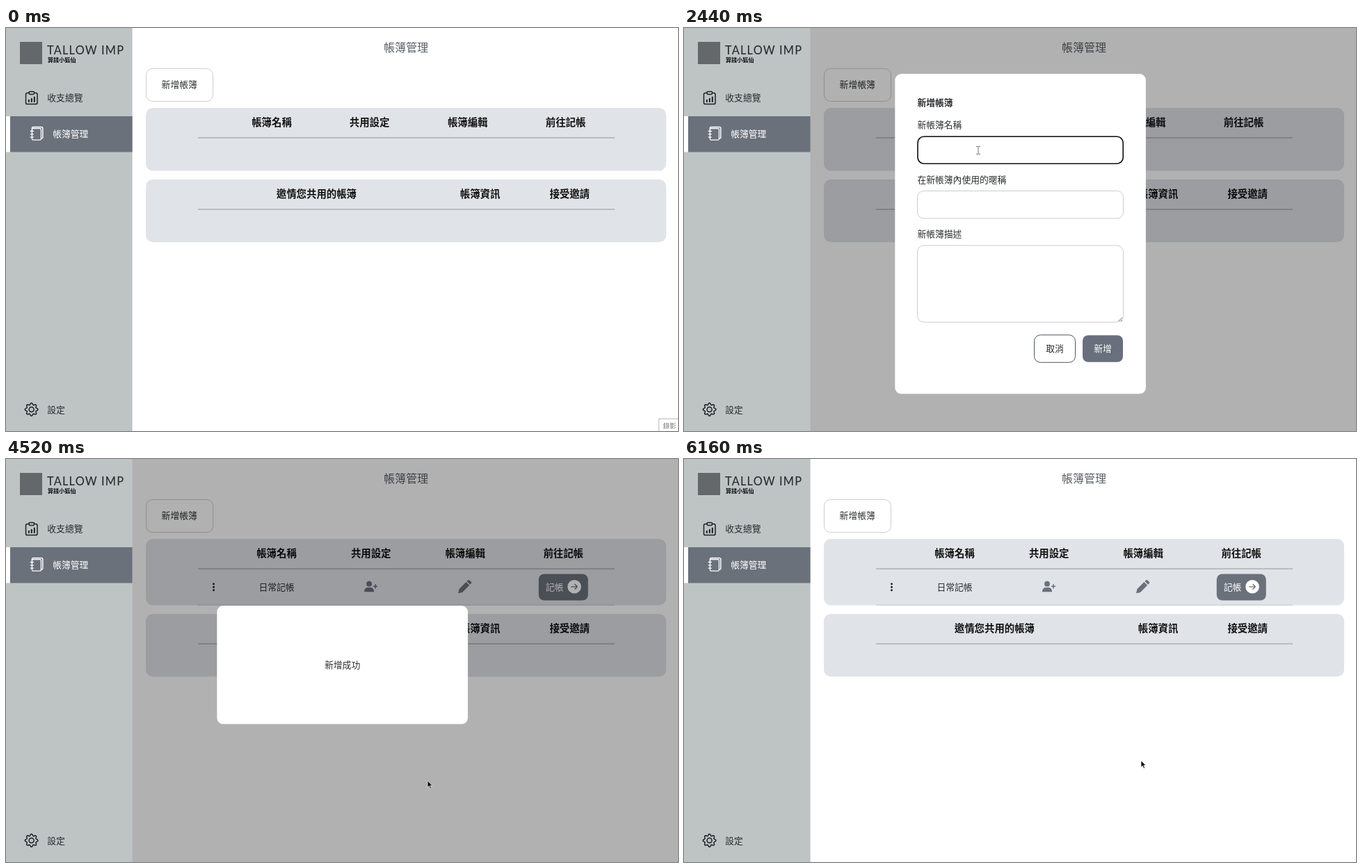
Recreate the animation shown at these times as an HTML page. Size 966 by 580 pixels, loop 6230 ms.

```html
<!DOCTYPE html>
<html lang="zh-Hant-TW">
<head>
<meta charset="utf-8">
<title>帳簿管理</title>
<style>
html, body { margin: 0; width: 100%; height: 100%; overflow: hidden; background: #fff; }
svg { display: block; width: 100%; height: 100%; }
text { font: 400 12.8px "Noto Sans CJK TC", "Noto Sans CJK", "Noto Sans CJK JP", sans-serif; fill: #2b2d30; }
.mid { text-anchor: middle; }
.head { font-size: 14.4px; font-weight: 700; fill: #111; text-anchor: middle; }
.white { fill: #fff; }
.panel { fill: #e0e3e8; }
.rule { stroke: #b9bdc0; stroke-width: 2; }
.field { fill: #fff; stroke: #c9ccd1; }
.line { fill: none; stroke: #1d2023; stroke-width: 1.5; stroke-linecap: round; stroke-linejoin: round; }

.early, .late, .shift, .tip, .name, .rest, .hover, .arrow, .beam, .hand {
  animation: 6230ms step-end infinite;
}
.early { animation-name: early; }
.late { animation-name: late; }
.shift { animation-name: shift; }
.tip { animation-name: tip; }
.name { animation-name: name; }
.rest { animation-name: rest; }
.hover { animation-name: hover; }
.arrow { animation-name: arrow; }
.beam { animation-name: beam; }
.hand { animation-name: hand; }
.layer { animation: layer 6230ms ease infinite; }
.focus { animation: focus 6230ms linear infinite; }
.cursor { animation: move 6230ms linear infinite; }

@keyframes early { 0% { opacity: 1 } 70.3%, 100% { opacity: 0 } }
@keyframes late { 0% { opacity: 0 } 70.3%, 100% { opacity: 1 } }
@keyframes shift { 0% { transform: none } 70.3%, 100% { transform: translateY(5px) } }
@keyframes tip { 0% { opacity: 1 } 1.12%, 100% { opacity: 0 } }
@keyframes name { 0% { opacity: 0 } 48.15%, 100% { opacity: 1 } }
@keyframes rest { 0% { opacity: 0 } 49.27%, 100% { opacity: 1 } }
@keyframes hover { 0% { opacity: 0 } 63.3% { opacity: 1 } 70.3%, 100% { opacity: 0 } }
@keyframes layer {
  0%, 17.5% { opacity: 0 }
  22.31%, 94.22% { opacity: 1 }
  98.8%, 100% { opacity: 0 }
}
@keyframes focus {
  0%, 29.4% { opacity: 0 }
  30.5%, 49.2% { opacity: 1 }
  49.27%, 100% { opacity: 0 }
}
@keyframes move {
  0%, 1.1% { transform: translate(950px, 588px); animation-timing-function: cubic-bezier(.35, .1, .4, 1) }
  11% { transform: translate(242px, 81px) }
  12.1%, 17.5% { transform: translate(245px, 80px); animation-timing-function: ease-in }
  19.7% { transform: translate(272px, 98px) }
  27.2% { transform: translate(418px, 173px) }
  28.4%, 39.2% { transform: translate(423px, 176px) }
  47%, 48.6% { transform: translate(893px, 584px) }
  49.3% { transform: translate(884px, 573px) }
  58.2% { transform: translate(709px, 494px) }
  63.4%, 64.9% { transform: translate(628.5px, 470px) }
  68.2%, 75% { transform: translate(606px, 463px); animation-timing-function: ease-in }
  80.1% { transform: translate(632px, 446px) }
  83.4%, 86.7% { transform: translate(661px, 415px) }
  90%, 100% { transform: translate(657px, 434px) }
}
@keyframes arrow {
  0% { opacity: 1 } 25.6% { opacity: 0 } 39.6% { opacity: 1 } 40.3% { opacity: 0 }
  41.1% { opacity: 1 } 41.8% { opacity: 0 } 42.6% { opacity: 1 } 63.3% { opacity: 0 } 70.3%, 100% { opacity: 1 }
}
@keyframes beam {
  0% { opacity: 0 } 25.6% { opacity: 1 } 39.6% { opacity: 0 } 40.3% { opacity: 1 }
  41.1% { opacity: 0 } 41.8% { opacity: 1 } 42.6%, 100% { opacity: 0 }
}
@keyframes hand { 0% { opacity: 0 } 63.3% { opacity: 1 } 70.3%, 100% { opacity: 0 } }
</style>
</head>
<body>
<svg viewBox="0 0 966 580">
  <rect width="966" height="580" fill="#fff"/>
  <text class="mid" x="575" y="33.5" style="font-size:16px;font-weight:500;fill:#595e65">帳簿管理</text>
  <rect x="201.5" y="58.5" width="96" height="47" rx="9" fill="#fff" stroke="#cbced2"/>
  <text class="mid" x="249.2" y="86.3">新增帳簿</text>

  <!-- own books -->
  <g class="early">
    <rect class="panel" x="201" y="115" width="748" height="90.5" rx="10"/>
    <text class="head" x="382" y="141.4">帳簿名稱</text>
    <text class="head" x="522.6" y="141.4">共用設定</text>
    <text class="head" x="663.7" y="141.4">帳簿編輯</text>
    <text class="head" x="804.6" y="141.4">前往記帳</text>
  </g>
  <g class="late">
    <rect class="panel" x="201" y="115" width="748" height="95.5" rx="10"/>
    <text class="head" x="389" y="141.4">帳簿名稱</text>
    <text class="head" x="524.7" y="141.4">共用設定</text>
    <text class="head" x="660.2" y="141.4">帳簿編輯</text>
    <text class="head" x="801.2" y="141.4">前往記帳</text>
    <path d="M276 210.2H875" stroke="#c3c7ca"/>
    <g fill="#222">
      <circle cx="298.5" cy="179.8" r="1.5"/><circle cx="298.5" cy="184.3" r="1.5"/><circle cx="298.5" cy="188.8" r="1.5"/>
    </g>
    <text class="mid" x="389" y="188.6">日常記帳</text>
    <g fill="#6b717b">
      <circle cx="522" cy="179.7" r="3.9"/>
      <path d="M515 191.2C515 186.8 517.6 184.9 520 184.9H524C526.6 184.9 529 186.8 529 191.2Z"/>
      <path d="M531 180.3V186.3M528 183.3H534" stroke="#6b717b" stroke-width="1.6"/>
      <path d="M650 193.2L651.3 187.2 661.4 177.1 666.1 181.8 656 191.9ZM662.5 176L664.2 174.3Q665.3 173.5 666.4 174.4L668.7 176.7Q669.7 177.8 668.8 178.9L667.1 180.7Z"/>
      <rect x="765.7" y="165.5" width="71" height="38" rx="8"/>
    </g>
    <text class="white" x="775.7" y="188.6">記帳</text>
    <circle cx="817" cy="183.8" r="9.8" fill="#fff"/>
    <path d="M812.6 183.8H821.2M817.8 180.3L821.3 183.8 817.8 187.3" fill="none" stroke="#6b717b" stroke-width="1.3" stroke-linecap="round" stroke-linejoin="round"/>
  </g>
  <path class="rule" d="M276 158H875"/>

  <!-- invitations -->
  <g class="shift">
    <rect class="panel" x="201" y="218" width="748" height="90.3" rx="10"/>
    <text class="head" x="446.4" y="244.4">邀情您共用的帳簿</text>
    <text class="head" x="681.6" y="244.4">帳簿資訊</text>
    <text class="head" x="810.2" y="244.4">接受邀請</text>
    <path class="rule" d="M276 261H875"/>
  </g>

  <g class="layer">
    <rect x="181" width="785" height="580" fill="#000" opacity=".305"/>
    <g class="early">
      <rect x="303.3" y="66" width="360.6" height="460.6" rx="9" fill="#fff"/>
      <text x="335.4" y="111.6" style="font-weight:700">新增帳簿</text>
      <text x="335.4" y="144">新帳簿名稱</text>
      <rect class="field" x="335.5" y="156" width="296" height="39.5" rx="9"/>
      <rect class="focus" x="336" y="156.2" width="295.2" height="39" rx="9" fill="none" stroke="#111" stroke-width="1.6"/>
      <text x="335.4" y="222.6">在新帳簿內使用的暱稱</text>
      <rect class="field" x="335.5" y="234.5" width="296" height="39.5" rx="9"/>
      <text x="335.4" y="301.2">新帳簿描述</text>
      <rect class="field" x="335.5" y="313" width="296" height="110.3" rx="9"/>
      <path d="M624.5 422.2L630 416.7M627.8 422.4L630.2 420" stroke="#555" stroke-width=".9"/>
      <text class="name" x="345.7" y="180.2">日常記帳</text>
      <text class="rest" x="345.7" y="258.8">小明</text>
      <text class="rest" x="342.6" y="334">存放日常開支</text>
      <rect x="503.5" y="441.8" width="59" height="39.5" rx="9" fill="#fff" stroke="#50555c"/>
      <text class="mid" x="533" y="466">取消</text>
      <rect x="573" y="442.2" width="58" height="38.6" rx="8" fill="#6a6f7d"/>
      <text class="mid white" x="602" y="466">新增</text>
      <g class="hover">
        <rect x="572.5" y="441.7" width="59.2" height="39.8" rx="8" fill="#bec4c4"/>
        <text class="mid" x="602" y="466" style="font-weight:700;fill:#111">新增</text>
      </g>
    </g>
    <g class="late">
      <rect x="303.3" y="211" width="360.6" height="170.6" rx="9" fill="#fff"/>
      <text class="mid" x="483.6" y="300.6">新增成功</text>
    </g>
  </g>

  <!-- sidebar -->
  <rect width="181.6" height="580" fill="#bec4c4"/>
  <rect x="20" y="20" width="32" height="32" fill="#64686a"/>
  <text x="59" y="37.5" style="font:500 16.3px Lato,sans-serif;letter-spacing:1.2px">TALLOW IMP</text>
  <text x="60" y="48.7" style="font-size:8.1px;font-weight:700;fill:#111">算錢小狐仙</text>

  <g class="line">
    <path d="M33 93.4H30.6Q28.5 93.4 28.5 95.5V107.4Q28.5 109.5 30.6 109.5H42.9Q45 109.5 45 107.4V95.5Q45 93.4 42.9 93.4H40.6"/>
    <rect x="33" y="91.4" width="7.6" height="4" rx="1.6"/>
    <path d="M32.8 103.7V106M36.8 101.7V106M40.8 99.4V106" stroke-width="2"/>
  </g>
  <text x="59.3" y="105.4">收支總覽</text>

  <rect y="127" width="6" height="51.5" fill="#fff"/>
  <rect x="6" y="127" width="175.6" height="51.5" fill="#6b717b"/>
  <g class="line" style="stroke:#fff">
    <path d="M37.4 146V144.6Q37.4 142.6 39.4 142.6H50.8Q52.8 142.6 52.8 144.6V157.4Q52.8 159 51.2 159"/>
    <path d="M37.4 158.6V159.4Q37.4 161.2 39.2 161.2H48.6Q50.4 161.2 50.4 159.4V146.3Q50.4 144.5 48.6 144.5H39.2Q37.4 144.5 37.4 146.3V158.6" stroke-width="1.3"/>
    <path d="M35.2 148.5H39.4M35.2 152.8H39.4M35.2 157.1H39.4" stroke-width="1.3"/>
  </g>
  <text class="white" x="67.2" y="157">帳簿管理</text>

  <g class="line">
    <path id="gear"/>
    <circle cx="36.6" cy="549" r="3.5"/>
  </g>
  <text x="59.3" y="554.2">設定</text>

  <g class="tip">
    <rect x="938.5" y="562.5" width="40" height="30" fill="#fff" stroke="#bbb"/>
    <text x="944.4" y="576.2" style="font-size:9.6px;fill:#777">錄影</text>
  </g>

  <g class="cursor">
    <path class="arrow" d="M0 0V9.6L2.2 7.6 3.9 11.2 5.5 10.4 3.8 7H6.8Z" fill="#111" stroke="#fff" stroke-width=".6"/>
    <path class="beam" d="M-3-5.5H-1L0-4.8 1-5.5H3M0-4.8V4.8M-3 5.5H-1L0 4.8 1 5.5H3" fill="none" stroke="#777"/>
    <path class="hand" d="M-1 .3Q0-1 1 .3V4.4L5.6 5.2Q7.2 5.6 7 7.4L6.2 11.3H.8L-2.4 7.3Q-2.8 5.8-1 6.4Z" fill="#161a14" stroke="#fff" stroke-width=".5"/>
  </g>
</svg>
<script>
// Eight soft lobes around the hub
const pts = [];
for (let i = 0; i < 96; i++) {
  const a = i / 96 * Math.PI * 2;
  const r = 8.1 + 1.2 * Math.cos(8 * a);
  pts.push((36.6 + r * Math.cos(a)).toFixed(2) + ' ' + (549 + r * Math.sin(a)).toFixed(2));
}
document.getElementById('gear').setAttribute('d', 'M' + pts.join('L') + 'Z');
</script>
</body>
</html>
```
